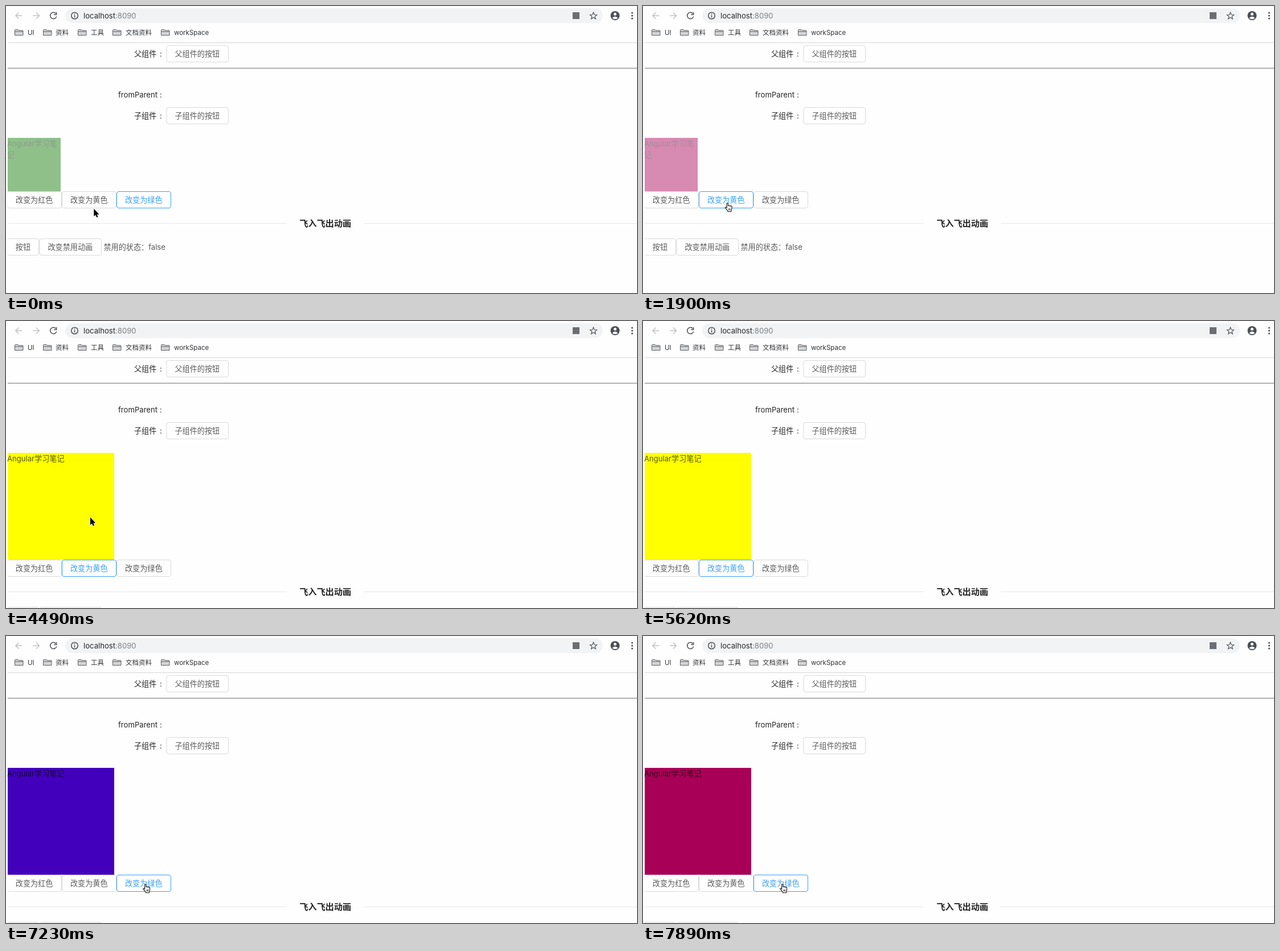
These frames come from a looping animation (1108 by 505 pixels, 8 s). An HTML page:

```html
<!DOCTYPE html>
<html lang="zh-CN">
<head>
<meta charset="utf-8">
<style>
  html, body { margin: 0; width: 100%; height: 100%; overflow: hidden; background: #fefefe; }
  svg { display: block; }
  text { font: 13.125px Inter, "Noto Sans CJK SC", "Noto Sans CJK", sans-serif; white-space: pre; }
  .label { fill: #262626; }
  .plain { fill: #595959; }
  .small { font-size: 11.5px; fill: #303236; }
  .title { font-size: 15.1px; font-weight: 600; fill: #262626; }
  .icon { fill: none; stroke: #4c4f54; stroke-width: 1.5; }
</style>
</head>
<body>
<svg id="stage" width="1108" height="505" viewBox="0 0 1108 505"></svg>
<script>
const LOOP = 8000, SHIFT = 94;
const GREY = [89, 89, 89], BORDER = [217, 217, 217], ACTIVE = [56, 159, 251];

const label = (x, y, text, cls = 'label') => `<text x="${x}" y="${y}" class="${cls}">${text}</text>`;
const line = (x1, x2, y, color, width = 1) =>
  `<path d="M${x1} ${y}H${x2}" stroke="${color}" stroke-width="${width}"/>`;
const button = (x, y, w, text, id = '') =>
  `<g id="${id}"><rect x="${x}" y="${y + .5}" width="${w}" height="29" rx="3.5" fill="#fff" stroke="#d9d9d9"/>
   ${label(x + 14.5, y + 19.8, text, 'plain')}</g>`;
const bookmark = (x, textX, text) =>
  `<path d="M${x + .5} 51.5V42.5Q${x + .5} 41.5 ${x + 1.5} 41.5H${x + 6}L${x + 7.5} 43H${x + 14}Q${x + 15} 43 ${x + 15} 44V51.5Z
   M${x + .5} 45H${x + 15}" fill="#d4d5d7" stroke="#5b5e62"/>` + label(textX, 51, text, 'small');

const star = Array.from({ length: 10 }, (_, i) => {
  const r = i % 2 ? 2.8 : 6.4, a = i * Math.PI / 5;
  return `${1031.5 + r * Math.sin(a)},${17.5 - r * Math.cos(a)}`;
}).join(' ');

const toolbar = `
  <g class="icon">
    <path d="M28.5 17H17M22.5 11.5L17 17L22.5 22.5M47 17H58.5M53 11.5L58.5 17L53 22.5" stroke="#c0c2c5"/>
    <path id="reload" d="M87.5 13.2A5.6 5.6 0 1 0 88.7 18.4M88.6 11V15.2H84.2"/>
  </g>
  <rect x="104" y="4" width="944" height="26" rx="13" fill="#f1f3f4"/>
  <g class="icon" stroke-width="1.3">
    <circle cx="120.5" cy="17" r="5.8"/><path d="M120.5 16V20.2M120.5 13.3V14.8"/>
    <polygon points="${star}" stroke-width="1.2"/>
  </g>
  <text x="136" y="21.6" fill="#25272a">localhost<tspan fill="#7c8186">:8090</tspan></text>
  <rect x="995" y="11" width="12" height="12" fill="#6b6e72"/>
  <circle cx="1069.5" cy="17" r="8" fill="#4c4f54"/>
  <circle cx="1069.5" cy="14.3" r="2.5" fill="#fff"/>
  <path d="M1064.5 21.2Q1069.5 15.8 1074.5 21.2Q1069.5 25 1064.5 21.2" fill="#fff"/>
  ${[12, 17, 22].map(y => `<circle cx="1099.5" cy="${y}" r="1.6" fill="#4c4f54"/>`).join('')}
  ${bookmark(15, 38, 'UI')}${bookmark(65, 87, '资料')}${bookmark(126, 149, '工具')}
  ${bookmark(187, 210, '文档资料')}${bookmark(272, 295, 'workSpace')}
  ${line(3, 1108, 64.5, '#d6d6d6')}`;

const form = `
  ${label(225, 88.8, '父组件')}${label(270, 88.8, ':')}${button(282, 69, 108.5, '父组件的按钮')}
  ${line(3, 1108, 109.6, '#969696', 1.5)}
  ${label(197, 161, 'fromParent')}${label(270, 161, ':')}
  ${label(225, 198, '子组件')}${label(270, 198, ':')}${button(282, 178, 108.5, '子组件的按钮')}`;

const lower = `
  <g id="lower">
    <rect id="wave" x="96" y="324" width="100" height="34" rx="5" fill="none" stroke="#40a9ff" stroke-opacity=".2" stroke-width="4"/>
    ${button(2.3, 326, 95.2, '改变为红色')}
    ${button(98.5, 326, 95, '改变为黄色', 'yellow')}
    ${button(194.5, 326, 95, '改变为绿色', 'green')}
    ${line(3, 493, 382.5, '#e8e8e8')}${line(628, 1108, 382.5, '#e8e8e8')}
    ${label(515.5, 387.5, '飞入飞出动画', 'title')}
    ${button(2.3, 409, 55.2, '按钮')}${button(59, 409, 108.5, '改变禁用动画')}
    ${label(171.5, 428.8, '禁用的状态：false', 'plain')}
    <rect y="320" width="3" height="130" fill="#fefefe"/>
  </g>`;

const box = `
  <g id="box">
    <rect id="fill" x="3" y="232"/>
    <g fill-opacity=".65"><text id="first" x="2" y="247"></text><text id="second" x="2" y="266.6"></text></g>
  </g>`;

const cursors = `
  <path id="arrow" d="M0 0V13.5L3 10.8L5 15.3L7.2 14.3L5.2 10H9.3Z" stroke="#fff" paint-order="stroke" stroke-width="1.6"/>
  <path id="hand" d="M3.6 9.2V1.9a1.15 1.15 0 0 1 2.3 0V6.2a1.1 1.1 0 0 1 2.2 .2a1.1 1.1 0 0 1 2.2 .5a1.1 1.1 0 0 1 2.2 .6V10.5Q12.5 12 11.5 13.5V16H5.5V14.6Q3.5 12.6 1 9.6A1 1 0 0 1 2.4 8.2Z
    M7.3 10.5V13.5M9.3 10.5V13.5" fill="#fff" stroke="#111" stroke-width="1.1"/>`;

const $ = id => document.getElementById(id);
$('stage').innerHTML = toolbar + form + lower + box + cursors;

const set = (el, attrs) => { for (const k in attrs) el.setAttribute(k, attrs[k]); };
const show = (el, on) => set(el, { visibility: on ? 'visible' : 'hidden' });
const rgb = c => `rgb(${c.map(Math.round)})`;
const mix = (a, b, p) => a.map((v, i) => v + (b[i] - v) * p);
const last = (steps, t) => steps.filter(s => s <= t).pop();
const blueToRed = ms => mix([0, 0, 255], [255, 0, 0], Math.min(1, ms / 1667));

function boxColor(t) {
  if (t < 800) return [10, 119, 0];
  if (t < 2260) return blueToRed(last([800, 1640, 1900, 2140], t) - 800);
  if (t < 4490) return [255, 46, 6];
  if (t < 7230) return [255, 255, 0];
  return blueToRed(last([7230, 7390, 7530, 7650, 7770, 7890], t) - 6791);
}

// Pointer stops: time, shape, x, y
const pointer = [
  [0, 'arrow', 154.3, 356.8], [120, 'hand', 143.5, 345.8], [4490, 'arrow', 148, 345.5],
  [5200, 'arrow', 307, 425], [5360, 'arrow', 380, 440], [5480, 'arrow', 394, 445],
  [5620, 'none', 0, 0], [7110, 'hand', 240, 435.8]
];

function focus(id, p) {
  const [rect, text] = $(id).children;
  set(rect, { stroke: rgb(mix(BORDER, ACTIVE, p)) });
  text.style.fill = rgb(mix(GREY, ACTIVE, p));
}

function draw(t) {
  const big = t >= 4490;
  set($('fill'), { width: big ? 187 : 93, height: big ? 188 : 94, fill: rgb(boxColor(t)) });
  set($('box'), { opacity: big ? 1 : .45 });
  $('first').textContent = big ? 'Angular学习笔记' : 'Angular学习笔';
  $('second').textContent = big ? '' : '记';
  set($('lower'), { transform: `translate(0 ${big ? SHIFT : 0})` });

  const toYellow = t < 400 ? 0 : Math.min(3, 1 + Math.floor((t - 400) / 120)) / 3;
  const yellow = t < 7110 ? toYellow : 0;
  focus('yellow', yellow);
  focus('green', 1 - yellow);
  $('lower').append;
  show($('wave'), t >= 800 && t < 950);
  $('reload').style.stroke = t >= 6990 && t < 7110 ? '#b4b6b9' : '';

  const [, shape, x, y] = pointer.filter(p => p[0] <= t).pop();
  for (const id of ['arrow', 'hand']) {
    show($(id), id === shape);
    set($(id), { transform: `translate(${x} ${y})` });
  }
}

const start = performance.now();
function tick() {
  draw((performance.now() - start) % LOOP);
  requestAnimationFrame(tick);
}
tick();
</script>
</body>
</html>
```
